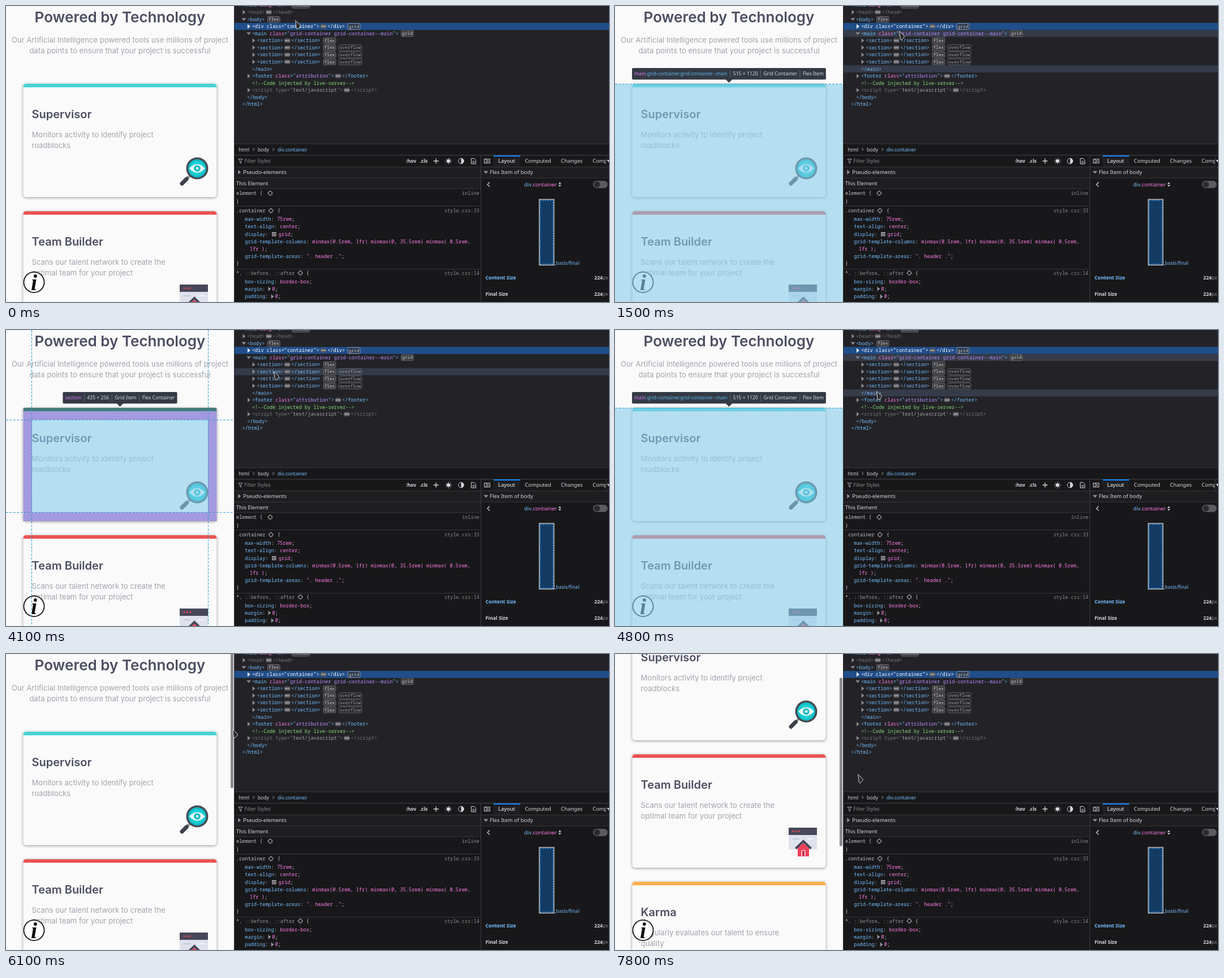
These frames come from a looping animation (1066 px wide and 525 px high, 8000 ms). An HTML page with a canvas:

```html
<!DOCTYPE html>
<html lang="en">
<head>
<meta charset="utf-8">
<title>Inspector demo</title>
<style>
html, body { margin: 0; width: 100%; height: 100%; overflow: hidden; background: #18181a; }
canvas { display: block; }
</style>
</head>
<body>
<canvas id="stage" width="1066" height="525"></canvas>
<script>
const c = document.getElementById('stage').getContext('2d');
const LOOP = 8000, PAGE_W = 403;
const MONO = '8.63px "Noto Sans Mono", "DejaVu Sans Mono", monospace';
const BADGE = '7.7px "Noto Sans Mono", "DejaVu Sans Mono", monospace';
const UI = (size, weight = 400) => `${weight} ${size}px "Noto Sans", "Open Sans", sans-serif`;
const PAGE = (size, weight = 400) => `${weight} ${size}px Inter, Roboto, sans-serif`;
const BLUE = '#75bfff', PINK = '#ff7de9', PURPLE = '#b98eff', GREY = '#8a8a8e', LIGHT = '#d7d7db';
const INK = '#4c4e61', SOFT = '#a2a4ae';

// Timelines: [start ms, ...state], each state holds until the next.
const CURSOR = [
  [0, 511, 25], [100, 511, 17], [300, 511, 9], [700, 509, 22], [800, 508, 27], [1000, 508, 28],
  [1200, 507, 31], [1300, 506, 36], [1400, 504, 41], [1500, 502, 44], [2500, 498, 44], [3300, 489, 38],
  [3500, 487, 43], [3600, 484, 48], [3700, 481, 55], [3800, 478, 60], [4000, 475, 68], [4100, 473, 73],
  [4200, 473, 76], [4800, 462, 108], [5100, 425, 158], [5200, 401, 162], [5300, 390, 152],
  [5500, 376, 146], [5600, 384, 143], [5700, 392, 139], [5800, 397, 136], [5900, 399, 134],
  [6100, 400, 133], [6600, 416, 170], [7300, 417, 232], [7400, 416, 226], [7600, 415, 223], [7800, 429, 213]
];
const HOVER = [
  [0], [300, 0], [700, 1, 12], [1200], [1400, 3, 8], [3300], [3500, 3, 8],
  [3700, 4], [4000, 5], [4800, 3, 8], [5100, 1, 12], [5200, 11], [5300]
];
const OVERLAY = [
  [0, ''], [800, 'body'], [1300, 'container'], [1500, 'main'], [3300, 'container'], [3600, 'main'],
  [3800, 'first'], [4200, 'second'], [4800, 'main'], [5100, 'body'], [5300, '']
];
const SCROLL = [[0, 0], [6600, 110], [6800, 182], [7300, 196], [7400, 208], [7600, 204], [7800, 186]];

const BOXES = {
  body: { top: -200, bottom: 800 },
  container: { top: -63, bottom: 112.5, alpha: 0.7, bar: 122, up: true,
    info: ['div', '.container', '515 × 224', 'Grid Container', 'Flex Item'] },
  main: { top: 138.5, bottom: 1018, bar: 110,
    info: ['main', '.grid-container.grid-container--main', '515 × 1120', 'Grid Container', 'Flex Item'] },
  first: { top: 138, bottom: 339, padded: true, bar: 110,
    info: ['section', '', '435 × 256', 'Grid Item', 'Flex Container'] },
  second: { top: 364, bottom: 565, padded: true, bar: 336,
    info: ['section', '', '435 × 256', 'Grid Item', 'Flex Container'] }
};

const CARDS = [
  ['#45d3d3', 'Supervisor', 'Monitors activity to identify project', 'roadblocks', magnifier],
  ['#ea5353', 'Team Builder', 'Scans our talent network to create the', 'optimal team for your project', house],
  ['#fcae4a', 'Karma', 'Regularly evaluates our talent to ensure', 'quality']
];

// Tree rows: row, depth, tag, arrow, folded, attribute, value, badges
const TREE = [
  [-1, 0, 'html', '', false, 'lang', 'en', 'scroll'],
  [0, 1, 'head', 'r', true],
  [1, 1, 'body', 'd', false, '', '', 'flex'],
  [2, 2, 'div', 'r', true, 'class', 'container', 'grid'],
  [3, 2, 'main', 'd', false, 'class', 'grid-container grid-container--main', 'grid'],
  [4, 3, 'section', 'r', true, '', '', 'flex'],
  [5, 3, 'section', 'r', true, '', '', 'flex overflow'],
  [6, 3, 'section', 'r', true, '', '', 'flex overflow'],
  [7, 3, 'section', 'r', true, '', '', 'flex overflow'],
  [8, 2, '/main'],
  [9, 2, 'footer', 'r', true, 'class', 'attribution'],
  [11, 2, 'script', 'r', true, 'type', 'text/javascript'],
  [12, 1, '/body'],
  [13, 0, '/html']
];

const at = (list, t) => list.filter(s => s[0] <= t).pop();
const rowY = k => 11 + 12.57 * k;

function rect(x, y, w, h, fill) { c.fillStyle = fill; c.fillRect(x, y, w, h); }
function pill(x, y, w, h, r, fill, stroke) {
  c.beginPath(); c.roundRect(x, y, w, h, r);
  if (fill) { c.fillStyle = fill; c.fill(); }
  if (stroke) { c.strokeStyle = stroke; c.lineWidth = 1; c.stroke(); }
}
function disc(x, y, r, fill) { c.beginPath(); c.arc(x, y, r, 0, 7); c.fillStyle = fill; c.fill(); }
function poly(points, fill) {
  c.beginPath();
  points.forEach(([x, y]) => c.lineTo(x, y));
  c.closePath(); c.fillStyle = fill; c.fill();
}
function path(d, stroke, width = 1) { c.strokeStyle = stroke; c.lineWidth = width; c.stroke(new Path2D(d)); }
function text(s, x, y, font, fill, align = 'left') {
  c.font = font; c.fillStyle = fill; c.textAlign = align;
  c.fillText(s, x, y);
  return x + c.measureText(s).width;
}
function code(x, y, ...parts) {
  for (const [s, color] of parts) x = text(s, x, y + 3, MONO, color);
  return x;
}
function twisty(x, y, dir, color = '#939397') {
  poly(dir === 'd' ? [[x - 4, y - 2], [x + 4, y - 2], [x, y + 2.6]]
                   : [[x - 2, y - 4], [x + 2.8, y], [x - 2, y + 4]], color);
}

function magnifier(y) {
  c.lineCap = 'round';
  path(`M325 ${y + 33} L320 ${y + 38}`, '#8b929b', 4);
  path(`M319.5 ${y + 38.5} L311 ${y + 47}`, '#3d434b', 7);
  c.lineCap = 'butt';
  disc(338, y + 20, 19.5, '#444b54');
  disc(338, y + 20, 16, '#0fbfc8');
  disc(338, y + 20, 12.5, '#1fd0d4');
  c.fillStyle = '#f1f8fa';
  c.fill(new Path2D(`M324 ${y + 20} Q338 ${y + 5} 352 ${y + 20} Q338 ${y + 35} 324 ${y + 20}`));
  disc(338, y + 20, 5.8, '#14b8c4');
  disc(338, y + 20, 2.4, '#d9f4f6');
}

function house(y) {
  rect(307, y, 50, 39, '#dfe2ec');
  rect(307, y, 50, 13, '#474759');
  for (let i = 0; i < 3; i++) disc(315 + 5.2 * i, y + 6.5, 1.6, '#e8435a');
  rect(314, y + 19, 12, 2, '#c3c7d6');
  rect(340, y + 19, 10, 2, '#f5f6fa');
  poly([[323, y + 36], [333, y + 27], [343, y + 36], [343, y + 51], [323, y + 51]], '#ef4059');
  rect(329.5, y + 40, 7, 11, '#fbe9ec');
  rect(331, y + 41, 4, 10, '#c9304a');
  path(`M319.5 ${y + 37} L333 ${y + 24} L346.5 ${y + 37}`, '#474759', 4);
}

function card(y, [color, title, line1, line2, icon]) {
  c.save();
  c.shadowColor = 'rgba(0,0,0,.42)'; c.shadowBlur = 5; c.shadowOffsetY = 1;
  pill(30.5, y, 342, 201, 5, '#fafafa');
  c.restore();
  c.save();
  c.beginPath(); c.roundRect(30.5, y, 342, 201, 5); c.clip();
  rect(30, y, 343, 6.2, color);
  c.restore();
  text(title, 45.5, y + 61, PAGE(20, 600), INK);
  text(line1, 45.5, y + 94.5, PAGE(13.1), SOFT);
  text(line2, 45.5, y + 113.5, PAGE(13.1), SOFT);
  if (icon) icon(y + (icon === house ? 130 : 130));
}

function infoBar({ bar, up, info: [tag, cls, ...rest] }) {
  const font = UI(8.6);
  c.font = font;
  const wide = s => c.measureText(s).width;
  const total = 8 + wide(tag) + wide(cls) + rest.reduce((sum, s) => sum + wide(s) + 10, 0);
  const left = 201.5 - total / 2;
  pill(left, bar, total, 20.5, 2, '#343a44');
  const base = up ? bar + 0.5 : bar + 20, tip = up ? bar - 5 : bar + 26;
  poly([[195.5, base], [207.5, base], [201.5, tip]], '#343a44');
  let x = text(tag, left + 4, bar + 13.2, font, '#d67df5');
  x = text(cls, x, bar + 13.2, font, '#5fb4ea');
  for (const s of rest) {
    rect(x + 4.5, bar + 4, 1, 12.5, '#636973');
    x = text(s, x + 10, bar + 13.2, font, LIGHT);
  }
}

function overlay(box) {
  c.save();
  c.globalAlpha = box.alpha || 0.6;
  let { top, bottom } = box, lines = [];
  if (box.padded) {
    rect(30.5, top, 342, 6.2, '#444444');
    c.beginPath();
    c.rect(30.5, top + 6.2, 342, 194.8);
    c.rect(46, top + 21.5, 311, 164);
    c.fillStyle = '#6a5acd'; c.fill('evenodd');
    top += 21.5; bottom -= 15.5;
    rect(46, top, 311, bottom - top, '#87ceeb');
    lines = ['M45.5 0 V525', 'M357.5 0 V525'];
  } else {
    rect(0, top, PAGE_W, bottom - top, '#87ceeb');
  }
  c.globalAlpha = 1;
  c.setLineDash([4, 2.4]);
  lines.push(`M0 ${top} H403`, `M0 ${bottom} H403`);
  lines.forEach(d => path(d, '#2b9bd6'));
  c.restore();
  if (box.info) infoBar(box);
}

function drawPage(t) {
  const scroll = at(SCROLL, t)[1];
  c.save();
  c.beginPath(); c.rect(0, 0, PAGE_W, 525); c.clip();
  rect(0, 0, PAGE_W, 525, '#fafafa');
  text('Powered by Technology', 201.5, 28.5 - scroll, PAGE(26, 600), INK, 'center');
  text('Our Artificial Intelligence powered tools use millions of project', 201.5, 65 - scroll, PAGE(13.1), SOFT, 'center');
  text('data points to ensure that your project is successful', 201.5, 83.5 - scroll, PAGE(13.1), SOFT, 'center');
  CARDS.forEach((item, i) => card(138 + 226 * i - scroll, item));
  disc(49.5, 490, 19, '#111');
  disc(49.5, 490, 17.2, '#fff');
  text('i', 49.5, 504, 'italic 700 40px "Liberation Serif", "Noto Serif", serif', '#111', 'center');
  if (t >= 5500) pill(397, -61 + 0.5538 * scroll, 5, 299, 2.5, '#8c8c90');
  const name = at(OVERLAY, t)[1];
  if (name) overlay(BOXES[name]);
  c.restore();
}

function badge(x, y, label, selected) {
  c.font = BADGE;
  const w = c.measureText(label).width + 4.5;
  const plain = label === 'overflow';
  pill(x + 0.5, y - 5, w - 1, 10.4, 2, plain ? '' : selected ? '#29364c' : '#3c3c41', selected ? '#8d9db8' : '#67676c');
  text(label, x + 2.2, y + 2.6, BADGE, plain ? '#aaaaae' : '#d0d0d4');
  return x + w + 4.5;
}

function treeRow([k, depth, tag, arrow, folded, attr, value, badges]) {
  const y = rowY(k), picked = k === 2, dim = tag === 'head' || tag === 'script';
  const tint = color => picked ? '#fff' : dim ? '#747478' : color;
  let x = 417.7 + 8.6 * depth;
  if (arrow) twisty(x - 5.8, y, arrow, picked ? '#fff' : '#8b8b8f');
  x = code(x, y, ['<' + tag, tint(BLUE)]);
  if (attr) {
    x = code(x, y, [' ' + attr, tint(PINK)], ['="', tint(BLUE)],
      [value, dim ? '#a5a5a9' : tint(PURPLE)], ['"', tint(BLUE)]);
  }
  x = code(x, y, ['>', tint(BLUE)]);
  if (folded) {
    pill(x + 2, y - 3.7, 10.5, 7.4, 2, '#5d5d63');
    for (let i = 0; i < 3; i++) disc(x + 4.6 + 2.6 * i, y, 0.9, '#e4e4e8');
    x = code(x + 14.2, y, [`</${tag}>`, tint(BLUE)]);
  }
  x += 4.5;
  if (badges) for (const b of badges.split(' ')) x = badge(x, y, b, picked);
}

function drawTree(t) {
  rect(404, 0, 662, 244, '#232327');
  at(HOVER, t).slice(1).forEach(k => rect(404, rowY(k) - 6.2, 662, 12.5, '#353b48'));
  rect(404, rowY(2) - 6.2, 662, 12.5, '#204e8a');
  TREE.forEach(treeRow);
  code(434.9, rowY(10), ['<!--Code injected by live-server-->', '#86de74']);
}

function target(x, y) {
  pill(x - 3, y - 3, 6, 6, 1.5, '', '#b1b1b3');
  path(`M${x} ${y - 4.8}v2.4 M${x} ${y + 2.4}v2.4 M${x - 4.8} ${y}h2.4 M${x + 2.4} ${y}h2.4`, '#b1b1b3');
}
function prop(y, name, value, gap = 0) {
  const x = code(422.2, y, [name, BLUE], [': ', LIGHT]);
  code(x + gap, y, [value, PINK], [';', LIGHT]);
  return x;
}
const origin = (s, y) => text(s, 837, y + 3, MONO, GREY, 'right');

function drawRules() {
  rect(404, 244, 662, 281, '#18181a');
  rect(404, 244, 662, 1, '#38383d');
  let x = text('html', 411.5, 257.5, UI(8.63), LIGHT);
  path('M436.5 251.8l2.4 2.6l-2.4 2.6 M471.5 251.8l2.4 2.6l-2.4 2.6', '#b1b1b3');
  text('body', 445, 257.5, UI(8.63), LIGHT);
  text('div.container', 480, 257.5, UI(8.63), BLUE);
  rect(404, 264, 662, 1.2, '#3e3e43');

  path('M411 271.5h7l-2.6 3.4v4l-1.8-1.2v-2.8z', '#a5a5a9');
  text('Filter Styles', 421.5, 278, UI(8.63), '#8c8c90');
  text(':hov', 707, 278, UI(8.63, 600), LIGHT);
  text('.cls', 731.5, 278, UI(8.63, 600), LIGHT);
  path('M760.3 270.5v9 M755.8 275h9', LIGHT, 1.3);
  disc(782.3, 275, 3.3, LIGHT);
  for (let i = 0; i < 8; i++) {
    const a = i * Math.PI / 4, dx = Math.cos(a), dy = Math.sin(a);
    path(`M${782.3 + dx * 4.2} ${275 + dy * 4.2}L${782.3 + dx * 5.8} ${275 + dy * 5.8}`, LIGHT);
  }
  path('M804.5 270.2a4.8 4.8 0 1 0 .01 0', LIGHT);
  c.fillStyle = LIGHT; c.fill(new Path2D('M804.5 270.2a4.8 4.8 0 0 1 0 9.6z'));
  path('M822.5 270.5h5l3 3v6.5h-8z M824.5 275.5h4 M824.5 277.8h4', LIGHT);

  rect(404, 285, 435, 39, '#1e1e21');
  [285, 304.5, 323.5, 354, 466.3].forEach(y => rect(404, y, 435, 1, '#38383d'));
  twisty(412.3, 294.8, 'r');
  text('Pseudo-elements', 419.3, 298.2, UI(9.42), LIGHT);
  text('This Element', 407, 317.7, UI(9.42), LIGHT);

  code(407, 332, ['element {', '#c4c4c8']); target(467, 332); origin('inline', 332);
  code(407, 347, ['}', '#c4c4c8']);
  code(407, 363, ['.container', '#c4c4c8']); target(468.3, 363); code(480, 363, ['{', '#c4c4c8']);
  origin('style.css:33', 363);
  prop(378, 'max-width', '75rem');
  prop(391, 'text-align', 'center');
  x = prop(404.5, 'display', 'grid', 13);
  for (let i = 0; i < 9; i++) rect(x + 1.5 + 2.7 * (i % 3), 401 + 2.7 * Math.floor(i / 3), 1.9, 1.9, LIGHT);
  code(422.2, 418, ['grid-template-columns', BLUE], [': ', LIGHT],
    ['minmax(0.5rem, 1fr) minmax(0, 35.5rem) minmax( 0.5rem,', PINK]);
  code(431, 431, ['1fr )', PINK], [';', LIGHT]);
  prop(444.3, 'grid-template-areas', '". header ."');
  code(407, 457.3, ['}', '#c4c4c8']);
  code(407, 473.5, ['*', '#c4c4c8'], [', ::before, ::after', '#939397']);
  target(520.3, 473.5); code(531, 473.5, ['{', '#c4c4c8']);
  origin('style.css:14', 473.5);
  prop(488.5, 'box-sizing', 'border-box');
  for (const [y, name] of [[501.8, 'margin'], [515.2, 'padding']]) twisty(prop(y, name, '0', 7) + 2, y, 'r');
}

function drawLayout() {
  rect(839, 265, 1, 260, '#3e3e43');
  path('M845.5 271.5h10v7h-10z M849 271.5v7', LIGHT);
  poly([[851, 273], [853.8, 275], [851, 277]], LIGHT);
  rect(862, 265, 47, 20, '#1f1f23');
  rect(862, 265, 47, 2, '#0a84ff');
  text('Layout', 870, 278.3, UI(9.42), '#fff');
  text('Computed', 917.3, 278.3, UI(9.42), LIGHT);
  text('Changes', 981, 278.3, UI(9.42), LIGHT);
  c.save(); c.beginPath(); c.rect(1030, 266, 31, 18); c.clip();
  text('Compatibility', 1037, 278.3, UI(9.42), LIGHT);
  c.restore();
  rect(1060.5, 266, 1, 19, '#38383d');
  twisty(1066, 275, 'd', LIGHT);
  rect(840, 285, 226, 19.5, '#1e1e21');
  rect(840, 285, 226, 1, '#38383d');
  rect(840, 304.5, 226, 1, '#38383d');
  twisty(848.5, 294.8, 'd');
  text('Flex Item of body', 855.3, 298.2, UI(9.42), LIGHT);

  path('M855 312.5l-4 4l4 4', LIGHT, 1.2);
  const x = text('div', 916, 320, UI(9.42), BLUE);
  text('.container', x, 320, UI(9.42), PINK);
  poly([[976.5, 315.6], [979, 312.6], [981.5, 315.6]], LIGHT);
  poly([[976.5, 317.6], [979, 320.6], [981.5, 317.6]], LIGHT);
  pill(1037.8, 310, 26, 13, 6.5, '#5a5a5f');
  disc(1044.8, 316.5, 5.2, '#2a2a2e');

  rect(943, 343.5, 25.5, 116, '#133a63');
  c.strokeStyle = '#c6c6ca'; c.lineWidth = 1.4; c.strokeRect(942.7, 343, 26, 116.5);
  c.save();
  c.setLineDash([2, 2.2]);
  c.strokeStyle = '#3d9bec'; c.strokeRect(944.6, 345, 22.2, 112.5);
  path('M970 459.5h4', BLUE);
  c.restore();
  text('basis/final', 972, 459.3, UI(8.63), BLUE);
  for (const [y, label, color] of [[485.2, 'Content Size', BLUE], [514.2, 'Final Size', LIGHT]]) {
    text(label, 847.8, y, UI(8.63, 700), color);
    text('px', text('224', 1040, y, UI(8.63, 600), LIGHT), y, UI(8.63), GREY);
  }
}

function drawCursor(t) {
  const [, x, y] = at(CURSOR, t);
  c.save();
  c.translate(x, y);
  c.lineJoin = 'round';
  poly([[0.7, 0.7], [9.7, 9.3], [8.8, 11.4], [4.6, 16], [2.4, 14.8]], '#2b2b2f');
  c.strokeStyle = '#d9d9dc'; c.lineWidth = 1; c.stroke();
  c.restore();
}

let start;
function frame(now) {
  start ??= now;
  const t = (now - start) % LOOP;
  rect(0, 0, 1066, 525, '#18181a');
  drawPage(t);
  rect(403, 0, 1, 525, '#38383d');
  drawTree(t);
  drawRules();
  drawLayout();
  drawCursor(t);
  requestAnimationFrame(frame);
}
requestAnimationFrame(frame);
</script>
</body>
</html>
```
